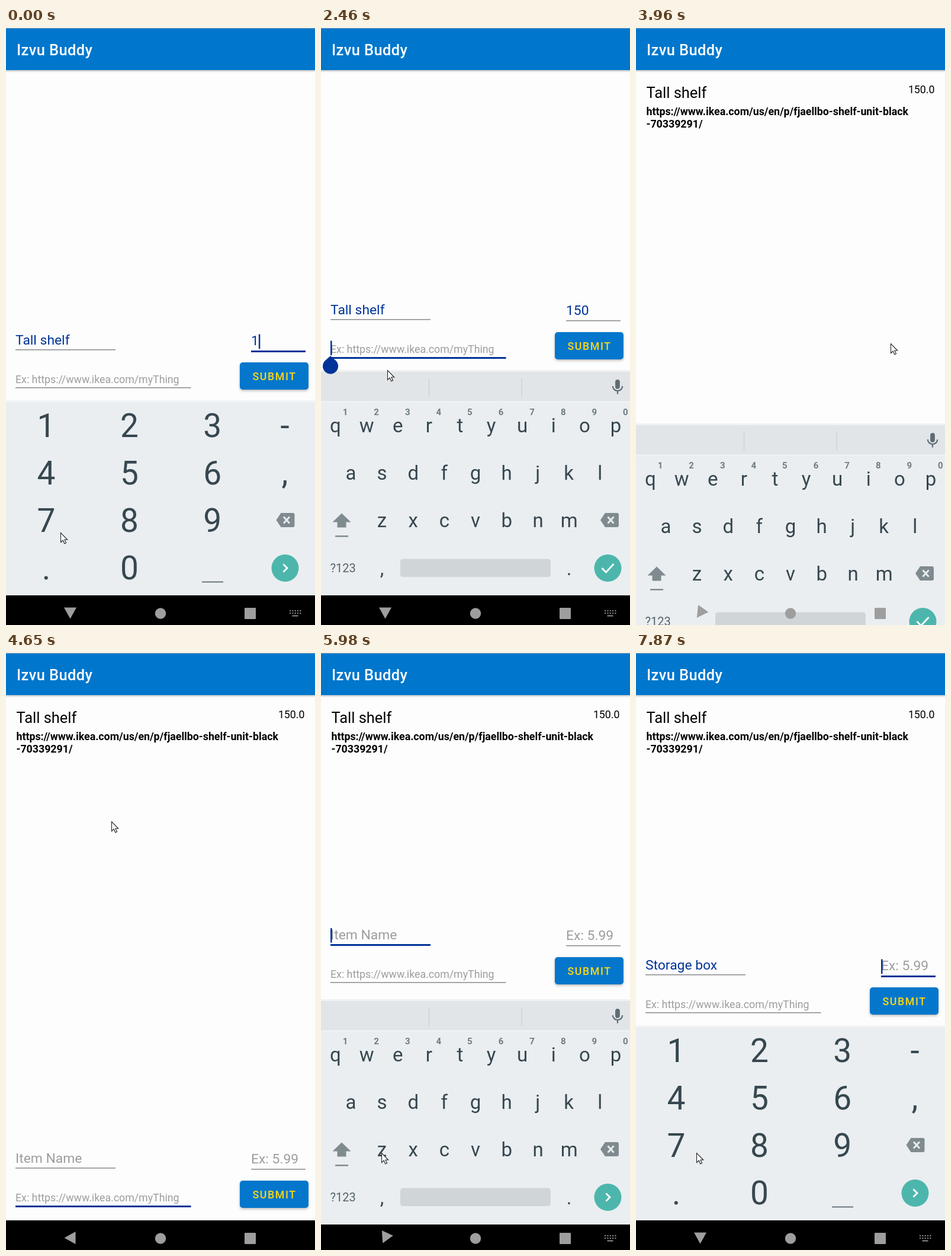
Write an HTML page that moves like this. It is 522 by 1007 pixels and loops after 8000 ms.

```html
<!DOCTYPE html>
<html lang="en">
<head>
<meta charset="utf-8">
<title>Shopping list</title>
<style>
  html, body { margin: 0; width: 100%; height: 100%; overflow: hidden; background: #fdfdfd; }
  svg { display: block; }
  text { font-family: Roboto, sans-serif; white-space: pre; }
  .mid { text-anchor: middle; }
  .digit { font-size: 55px; fill: #37474f; }
  .letter { font-size: 33px; fill: #37474f; }
  .hint { font-size: 15px; font-weight: 700; fill: #6f7b80; }
  .ink { fill: #808b90; }
  .nav { fill: #9e9e9e; }
  .white { fill: none; stroke: #fff; stroke-width: 2.8; }
  #submit rect { fill: #0477cc; filter: drop-shadow(0 2px 2px #0004); }
</style>
</head>
<body>
<svg id="stage" width="522" height="1007" viewBox="0 0 522 1007">
  <defs>
    <linearGradient id="shade" x2="0" y2="1">
      <stop stop-color="#000" stop-opacity=".22"/>
      <stop offset="1" stop-color="#000" stop-opacity="0"/>
    </linearGradient>
    <g id="erase">
      <path class="ink" d="M-15.500 0l8-12h20q3 0 3 3v18q0 3-3 3h-20z"/>
      <path d="M-3-5.500l10 11m0-11l-10 11" stroke="#eaeef1" stroke-width="2.800"/>
    </g>
    <g id="next">
      <circle r="23" fill="#4db6ac"/>
      <path class="white" d="M-3-6.500l6.500 6.500-6.500 6.500"/>
    </g>
    <g id="done">
      <circle r="23" fill="#4db6ac"/>
      <path class="white" d="M-10 0l7 7 13-14"/>
    </g>
  </defs>

  <rect width="522" height="1007" fill="#fdfdfd"/>
  <rect y="71" width="522" height="4" fill="url(#shade)"/>
  <rect width="522" height="71" fill="#0077cc"/>
  <rect width="522" height="1" fill="#7f9db5"/>
  <text x="18" y="45.500" font-size="25.400" font-weight="500" letter-spacing=".4" fill="#fff">Izvu Buddy</text>

  <g id="list">
    <text x="17.500" y="118" font-size="25.400">Tall shelf</text>
    <text x="504.500" y="110" font-size="17.780" text-anchor="end">150.0</text>
    <g font-size="17.780" font-weight="700">
      <text x="17.500" y="147">https://www.ikea.com/us/en/p/fjaellbo-shelf-unit-black</text>
      <text x="17.500" y="168">-70339291/</text>
    </g>
  </g>

  <g id="form">
    <g id="fields"></g>
    <g id="submit">
      <rect x="395" y="564" width="116" height="46" rx="5"/>
      <text x="416.500" y="594" font-size="17.780" font-weight="500" letter-spacing="1.590" fill="#ffd80f">SUBMIT</text>
    </g>
  </g>

  <rect y="957" width="522" height="50"/>

  <g id="num">
    <rect y="628" width="522" height="3" fill="#f3f5f6"/>
    <rect y="631" width="522" height="326" fill="#eaeef1"/>
    <rect x="331" y="933.500" width="36" height="1.800" fill="#5f6c73"/>
    <use href="#erase" x="472" y="830"/>
    <use href="#next" x="471.500" y="911"/>
  </g>

  <g id="abc">
    <rect y="577" width="522" height="4" fill="#eff1f2"/>
    <rect y="580" width="522" height="50" fill="#e1e5e8"/>
    <rect y="630" width="522" height="327" fill="#eaeef1"/>
    <rect y="629.500" width="522" height="1.500" fill="#f4f6f7"/>
    <path d="M182.500 591v31M339 591v31" stroke="#cdd2d5" stroke-width="1.500"/>
    <g transform="translate(501 605)" stroke="#5f6c73" fill="none" stroke-width="2.200">
      <rect x="-2.800" y="-10.800" width="5.600" height="13.500" rx="2.800" fill="#5f6c73"/>
      <path d="M-8.200-1a8.200 8 0 0 0 16.400 0M0 7v5.500"/>
    </g>
    <path class="ink" d="M35 818.500l15.500 15h-8v9h-15v-9h-8z"/>
    <rect class="ink" x="24" y="856" width="22" height="2.500"/>
    <use href="#erase" x="487.500" y="830"/>
    <text x="15.500" y="918" font-size="20" fill="#55636a">?123</text>
    <rect x="134" y="895.500" width="254" height="30.500" rx="4.500" fill="#d0d5d8"/>
    <use id="action" x="484.500" y="911"/>
  </g>

  <path id="handle" fill="#003399" d="M16 553l9 8a13 13 0 1 1-18 0z"/>

  <path id="back" class="nav" d="M-10 0L9-10.500v21z"/>
  <circle class="nav" cx="261" cy="987.500" r="9.200"/>
  <rect class="nav" x="403" y="978" width="19" height="19" rx="1"/>
  <g id="keysIcon" stroke="#8b8b8b" stroke-width="2">
    <path d="M479 983h19.500M479 987h19.500" stroke-dasharray="2.200 2.120"/>
    <path d="M483.500 991.500h10"/>
  </g>

  <path id="mouse" d="M.5.500v16l3.700-3.500 2.600 5.700 2.700-1.200-2.600-5.500h4.800z" fill="#fff" stroke="#222" stroke-width="1.100"/>
</svg>

<script>
const $ = id => document.getElementById(id);
const LOOP = 8000;
const BLUE = '#003399';
const LINK = 'https://www.ikea.com/us/en/p/fjaellbo-shelf-unit-black-70339291/';

function add(parent, tag, attrs, text = '') {
  const node = document.createElementNS('http://www.w3.org/2000/svg', tag);
  for (const key in attrs) node.setAttribute(key, attrs[key]);
  node.textContent = text;
  return parent.appendChild(node);
}

// Keyboards
function keyRow(board, chars, x, gap, y, type) {
  [...chars].forEach((c, i) => add(board, 'text', { x: x + i * gap, y, class: 'mid ' + type }, c));
}
['123', '456', '789', '.0'].forEach((row, i) => keyRow($('num'), row, 68, 140.4, 690 + i * 80, 'digit'));
keyRow($('num'), '-', 471, 0, 690, 'digit');
keyRow($('num'), ',', 471, 0, 769, 'digit');
keyRow($('abc'), '1234567890', 41, 52.6, 653, 'hint');
keyRow($('abc'), 'qwertyuiop', 24.5, 52.6, 682, 'letter');
keyRow($('abc'), 'asdfghjkl', 50.5, 52.6, 762, 'letter');
keyRow($('abc'), 'zxcvbnm', 103, 52.7, 842, 'letter');
keyRow($('abc'), ',.', 103, 316, 923, 'letter');

// Input fields: baseline y, underline top and caret top
const fields = {
  name: { x: 16, w: 169, y: 533.5, line: 542, top: 515, size: 22.86, hint: 'Item Name' },
  price: { x: 414, w: 92, y: 535, line: 544, top: 516.5, size: 22.86, hint: 'Ex: 5.99' },
  url: { x: 16, w: 296.5, y: 598.5, line: 606, top: 578.5, size: 17.78, hint: 'Ex: https://www.ikea.com/myThing' }
};
for (const f of Object.values(fields)) {
  const box = add($('fields'), 'svg', { x: f.x, y: 500, width: f.w, height: 120, overflow: 'hidden' });
  f.text = add(box, 'text', { y: f.y - 500, 'font-size': f.size });
  f.rule = add($('fields'), 'rect', { x: f.x, y: f.line, width: f.w });
  f.bar = add($('fields'), 'rect', { y: f.top, width: 2.5, height: 24.5, fill: BLUE });
}

// Each step changes part of the previous state
const start = {
  name: 'Tall shelf', price: '1', url: '', focus: ['price'], caret: 'price', pressed: '',
  form: true, dy: 0, board: 'num', drop: 0, action: 'done', handle: false,
  list: false, turn: -90, icon: true, mouse: [92, 851]
};
const steps = [
  [0, {}],
  [120, { price: '15' }],
  [270, { price: '150' }],
  [700, { caret: '', mouse: [93, 845] }],
  [840, { mouse: [98, 790] }],
  [980, { mouse: [108, 680] }],
  [1110, { mouse: [114, 605] }],
  [1250, { caret: 'price', mouse: [112, 577] }],
  [1390, { focus: ['price', 'url'], pressed: 'url' }],
  [1820, { caret: '' }],
  [2220, { focus: ['url'], pressed: '', caret: 'url', board: 'abc', dy: -51 }],
  [2350, { handle: true }],
  [2720, { url: LINK, handle: false }],
  [2990, { mouse: [150, 575] }],
  [3120, { mouse: [230, 560] }],
  [3270, { mouse: [330, 545] }],
  [3410, { mouse: [400, 536] }],
  [3550, { mouse: [430, 532] }],
  [3840, { form: false, icon: false }],
  [3960, { form: true, dy: 326, list: true, name: '', price: '', url: '', drop: 90, turn: -55 }],
  [4100, { drop: 300, turn: -15 }],
  [4230, { board: '', turn: 0, mouse: [422, 515] }],
  [4380, { mouse: [335, 400] }],
  [4500, { mouse: [240, 305] }],
  [4650, { caret: '', mouse: [178, 284] }],
  [4800, { mouse: [170, 271] }],
  [4930, { mouse: [150, 380] }],
  [5070, { caret: 'url', mouse: [125, 560] }],
  [5200, { mouse: [110, 740] }],
  [5340, { mouse: [104, 854] }],
  [5470, { mouse: [102, 843] }],
  [5740, { focus: ['name'], caret: 'name' }],
  [5860, { dy: -51, board: 'abc', drop: 110, action: 'next', turn: -30, icon: true }],
  [5980, { drop: 7, turn: -65 }],
  [6130, { drop: 0, turn: -90 }],
  ...[...'Storage box'].map((c, i, all) => [6260 + i * 133, { name: all.slice(0, i + 1).join('') }]),
  [7730, { focus: ['price'], caret: 'price', board: 'num', dy: 0 }]
];
let last = start;
const states = steps.map(([, change]) => last = { ...last, ...change });

const show = (id, on) => $(id).style.display = on ? '' : 'none';
const move = (id, x, y, turn = 0) => $(id).setAttribute('transform', `translate(${x} ${y}) rotate(${turn})`);

function drawField(key, s) {
  const f = fields[key], value = s[key];
  f.text.textContent = value || f.hint;
  f.text.setAttribute('fill', value ? BLUE : s.pressed === key ? '#777' : '#9d9d9d');
  const length = value ? f.text.getComputedTextLength() : 0;
  const shift = Math.min(0, f.w - 3 - length);
  f.text.setAttribute('x', shift);
  const active = s.focus.includes(key);
  f.rule.setAttribute('height', active ? 3 : 1.5);
  f.rule.setAttribute('fill', active ? BLUE : '#8a8a8a');
  f.bar.setAttribute('x', f.x + length + shift);
  f.bar.style.display = s.caret === key ? '' : 'none';
}

function draw(s) {
  show('form', true);
  for (const key in fields) drawField(key, s);
  show('form', s.form);
  move('form', 0, s.dy);
  show('list', s.list);
  for (const id of ['num', 'abc']) show(id, s.board === id);
  move('abc', 0, s.drop);
  $('action').setAttribute('href', '#' + s.action);
  show('handle', s.handle);
  move('back', 108.5, 986.5, s.turn);
  show('keysIcon', s.icon);
  move('mouse', ...s.mouse);
}

let shown = -1;
function tick() {
  const t = performance.now() % LOOP;
  const now = steps.findLastIndex(([at]) => at <= t);
  if (now !== shown) draw(states[shown = now]);
  requestAnimationFrame(tick);
}
tick();
</script>
</body>
</html>
```
